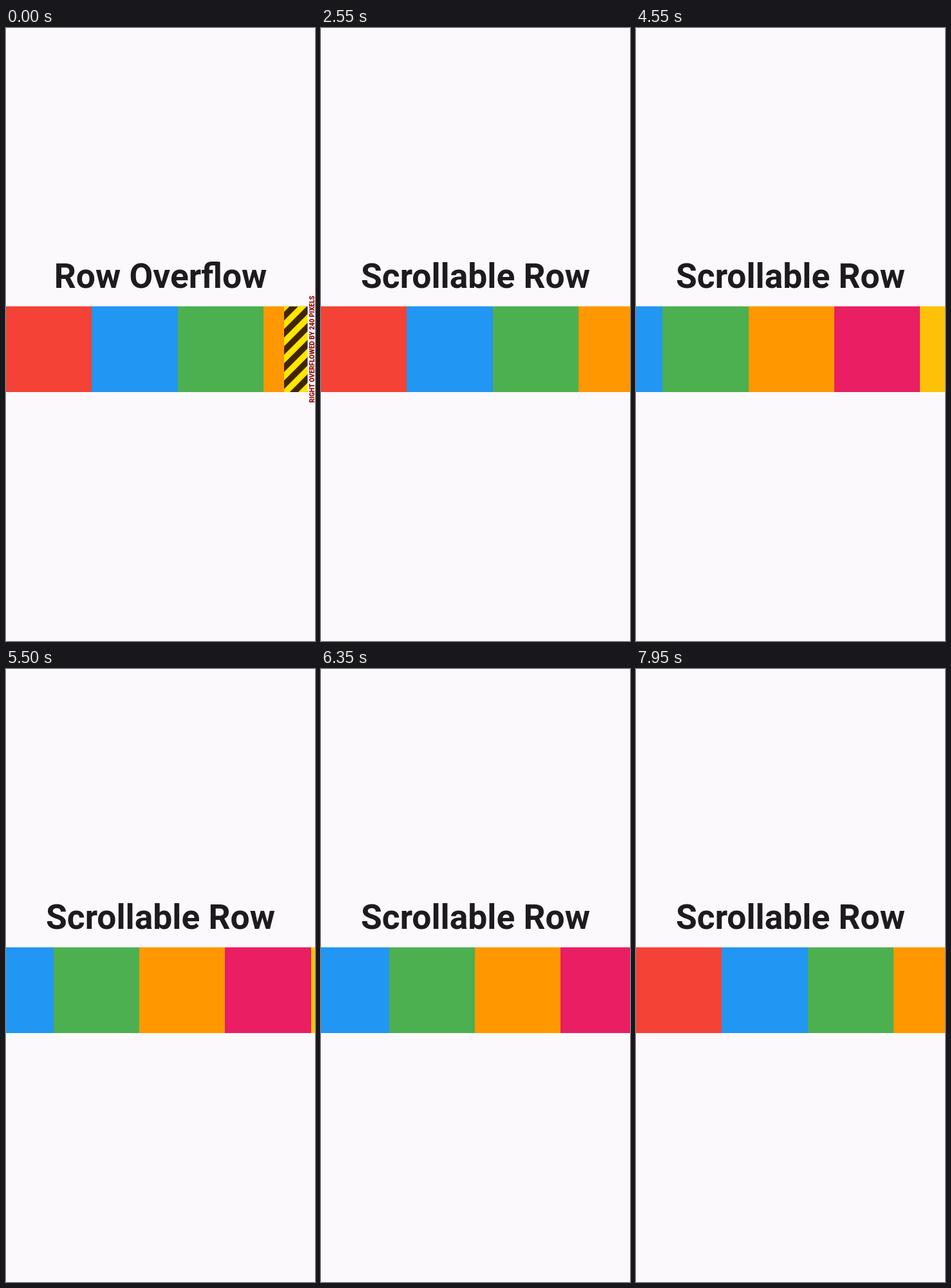
Animation, 480 px wide and 953 px high, one loop 8 s. Source, as an HTML page with a canvas:

```html
<!DOCTYPE html>
<html lang="en">
<head>
<meta charset="utf-8">
<style>
  html, body { margin: 0; width: 100%; height: 100%; overflow: hidden; background: #fbf9fc; }
  canvas { display: block; }
</style>
</head>
<body>
<canvas id="stage" width="480" height="953"></canvas>
<script>
const ctx = document.getElementById('stage').getContext('2d');
const LOOP = 8000, SWITCH = 1700;
const BOX = 400 / 3, TOP = 432.67, MAX_SCROLL = 320;
const COLORS = ['#f44336', '#2196f3', '#4caf50', '#ff9800', '#e91e63', '#ffc107'];

// Each swipe: start time, end time, offset before, offset after
const SWIPES = [
  [4180, 4760, 0, MAX_SCROLL],
  [5290, 5780, MAX_SCROLL, 0],
  [6100, 6600, 0, MAX_SCROLL],
  [7000, 7480, MAX_SCROLL, 0]
];

const ease = p => p * p * (3 - 2 * p);

function scrollAt(t) {
  let offset = 0;
  for (const [start, end, from, to] of SWIPES) {
    if (t >= start) offset = from + (to - from) * ease(Math.min(1, (t - start) / (end - start)));
  }
  return offset;
}

function drawTitle(text) {
  ctx.font = 'bold 53.333px Roboto, sans-serif';
  ctx.textAlign = 'center';
  ctx.textBaseline = 'alphabetic';
  ctx.fillStyle = '#1d1b20';
  ctx.fillText(text, 240, 403.5);
}

function drawRow(offset) {
  COLORS.forEach((color, i) => {
    const left = Math.round(i * BOX - offset), right = Math.round((i + 1) * BOX - offset);
    ctx.fillStyle = color;
    ctx.fillRect(left, TOP, right - left, BOX);
  });
}

function drawOverflowMarker() {
  const period = 80 / 3;
  ctx.save();
  ctx.beginPath();
  ctx.rect(432, TOP, 48, BOX);
  ctx.clip();
  ctx.fillStyle = '#402600';
  ctx.fillRect(432, TOP, 48, BOX);
  ctx.fillStyle = '#ffe500';
  // Diagonal bands where x + y lies in the middle half of each period
  for (let sum = Math.floor(860 / period) * period; sum < 1060; sum += period) {
    const a = sum + period / 4, b = sum + period * 3 / 4;
    ctx.beginPath();
    ctx.moveTo(a - 430, 430);
    ctx.lineTo(b - 430, 430);
    ctx.lineTo(b - 570, 570);
    ctx.lineTo(a - 570, 570);
    ctx.fill();
  }
  ctx.restore();

  ctx.save();
  ctx.translate(480, TOP + BOX / 2);
  ctx.rotate(-Math.PI / 2);
  ctx.font = '800 10px Roboto, sans-serif';
  ctx.textAlign = 'center';
  ctx.fillStyle = '#fff';
  ctx.fillRect(-83, -11.5, 166, 12);
  ctx.fillStyle = '#900';
  ctx.fillText('RIGHT OVERFLOWED BY 240 PIXELS', 0, -1.5);
  ctx.restore();
}

function draw(now) {
  const t = now % LOOP;
  const overflowing = t < SWITCH;
  ctx.fillStyle = '#fbf9fc';
  ctx.fillRect(0, 0, 480, 953);
  drawTitle(overflowing ? 'Row Overflow' : 'Scrollable Row');
  drawRow(scrollAt(t));
  if (overflowing) drawOverflowMarker();
}

const begin = performance.now();
function tick() {
  draw(performance.now() - begin);
  requestAnimationFrame(tick);
}
tick();
</script>
</body>
</html>
```
